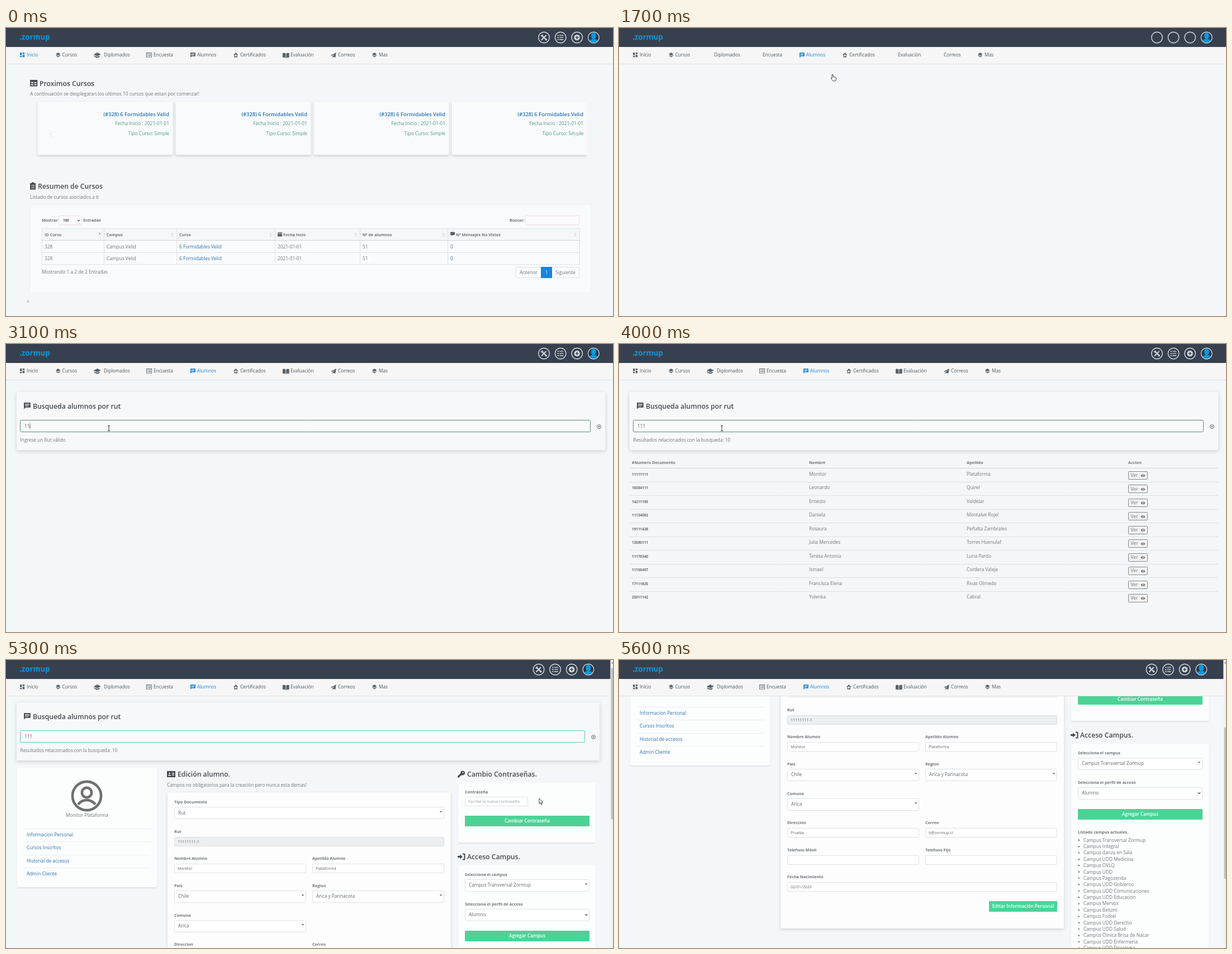
An HTML page with a canvas that plays this animation: 1086x516 px, repeating every 6300 ms.

```html
<!DOCTYPE html>
<html lang="es">
<head>
<meta charset="utf-8">
<title>Busqueda alumnos</title>
<style>
html, body { margin: 0; width: 100%; height: 100%; overflow: hidden; background: #f4f7f9; }
canvas { display: block; width: 1086px; height: 516px; }
</style>
</head>
<body>
<canvas id="stage"></canvas>
<script>
const W = 1086, H = 516, LOOP = 6300, STEP = 100;
const canvas = document.getElementById('stage');
const c = canvas.getContext('2d');
const dpr = window.devicePixelRatio || 1;
canvas.width = W * dpr;
canvas.height = H * dpr;

const FONT = '"Open Sans", "Noto Sans", sans-serif';
const DARK = '#454b52', GREY = '#707478', BLUE = '#2a6fb3', GREEN = '#4bd396', LINE = '#dde1e4';

const ICONS = {
  dash: 'M0 0h5v7h-5zM7 0h5v4h-5zM0 9h5v3h-5zM7 6h5v6h-5z',
  layers: 'M6 0L12 4 6 8 0 4zM1.5 6.5L6 9.5 10.5 6.5 12 7.5 6 12 0 7.5z',
  cap: 'M8 0L16 4 8 8 0 4zM3 7L8 9.5 13 7V10Q8 13 3 10zM1 5h1v6h-1z',
  news: 'M0 0h13v11H0zM1.2 1.2v8.6h10.6V1.2zM2.5 3h2v1h-2zM5.5 3h5v1h-5zM2.5 5h2v1h-2zM5.5 5h5v1h-5zM2.5 7h2v1h-2zM5.5 7h5v1h-5z',
  chat: 'M0 0h12v9H3l-3 3zM2 2h8v1H2zM2 4h8v1H2zM2 6h6v1H2z',
  house: 'M6 0L12 6H10V12H2V6H0zM5 4.5h2v2h2v2H7v2H5v-2H3v-2h2z',
  book: 'M0 1Q4 0 6 2V11Q4 9 0 10zM7 2Q9 0 13 1V10Q9 9 7 11z',
  plane: 'M12 0L10 11 6 9 4 12V8L10 2 3 7 0 6z',
  table: 'M0 0h14v12H0zM2 4h4v2H2zM8 4h4v2H8zM2 8h4v2H2zM8 8h4v2H8z',
  clip: 'M0 1.5h3V0h4v1.5h3V13H0zM2 4.5h1v1H2zM4 4.5h4v1H4zM2 7h1v1H2zM4 7h4v1H4zM2 9.5h1v1H2zM4 9.5h4v1H4z',
  cal: 'M0 1h2V0h1v1h3V0h1v1h2v8H0zM0 3v.8h9V3z',
  msg: 'M1 0h7q1 0 1 1v4q0 1-1 1H4L2 8V6H1Q0 6 0 5V1Q0 0 1 0z',
  card: 'M0 0h15v11H0zM2 8.5h5v-1q-2.5-2-5 0zM3.2 4a1.3 1.3 0 1 0 2.6 0a1.3 1.3 0 1 0-2.6 0zM9 3h4v1H9zM9 5h4v1H9zM9 7h4v1H9z',
  key: 'M9 0a4 4 0 1 1-1.6 7.6L6 9H4.5V10.5H3V12H0V9.5L5.2 4.8A4 4 0 0 1 9 0zM9.5 2a1.2 1.2 0 1 0 .1 0z',
  login: 'M0 4.5h4V2l5 4-5 4V7.5H0zM9 0h3q1.5 0 1.5 1.5v9q0 1.5-1.5 1.5H9V10h2.5V2H9z',
  eye: 'M0 3Q4-2 8 3 4 8 0 3zM4 1.2a1.8 1.8 0 1 0 .1 0zM4 2.2a.8 .8 0 1 0 .1 0z',
  rows: 'M0 0h2v2H0zM3.5 .2H11v1.5H3.5zM0 4h2v2H0zM3.5 4.2H11v1.5H3.5zM0 8h2v2H0zM3.5 8.2H11v1.5H3.5z',
  plus: 'M5.5 0a5.5 5.5 0 1 0 .01 0zM4.7 2.5h1.6v2.2h2.2v1.6H6.3v2.2H4.7V6.3H2.5V4.7h2.2z',
  arrow: 'M0 0V10.2L2.4 8 4 11.6 5.6 10.9 4 7.4H7.2z',
  hand: 'M0 1Q1-.6 2 1V4.6Q3.2 3.8 4 5 5.2 4.3 6 5.4 7.6 5 7.8 6.5V9Q7.6 11 6.6 12.5H1.8Q0 10-1.8 7.6-1.6 6.2 0 7.6z'
};
for (const k in ICONS) ICONS[k] = new Path2D(ICONS[k]);

function icon(name, x, y, color = '#565e66', s = 1, edge) {
  c.save();
  c.translate(x, y);
  c.scale(s, s);
  c.fillStyle = color;
  c.fill(ICONS[name], 'evenodd');
  if (edge) {
    c.strokeStyle = edge;
    c.lineWidth = 0.9;
    c.stroke(ICONS[name]);
  }
  c.restore();
}

function text(s, x, y, size = 8.3, color = GREY, weight = 400, align = 'left') {
  c.font = `${weight} ${size}px ${FONT}`;
  c.fillStyle = color;
  c.textAlign = align;
  c.fillText(s, x, y);
}
const title = (s, x, y) => text(s, x, y, 12.2, DARK, 600);
const label = (s, x, y) => text(s, x, y, 7.2, GREY, 700);
const crisp = v => Math.round(v) + 0.5;

function rect(x, y, w, h, fill, stroke, r = 0) {
  c.beginPath();
  c.roundRect(x, y, w, h, r);
  if (fill) { c.fillStyle = fill; c.fill(); }
  if (stroke) { c.strokeStyle = stroke; c.lineWidth = 1; c.stroke(); }
}

function panel(x, y, w, h, fill, blur = 5, alpha = 0.18, r = 2) {
  c.save();
  c.shadowColor = `rgba(40,55,70,${alpha})`;
  c.shadowBlur = blur * dpr;
  c.shadowOffsetY = 2 * dpr;
  rect(x, y, w, h, fill, null, r);
  c.restore();
}

function line(color, width, ...p) {
  c.beginPath();
  for (let i = 0; i < p.length; i += 2) c.lineTo(p[i], p[i + 1]);
  c.strokeStyle = color;
  c.lineWidth = width;
  c.stroke();
}

function ring(x, y, r, color, width, fill) {
  c.beginPath();
  c.arc(x, y, r, 0, Math.PI * 2);
  if (fill) { c.fillStyle = fill; c.fill(); }
  if (width) { c.strokeStyle = color; c.lineWidth = width; c.stroke(); }
}

function caret(x, y, s, color = '#777', dir = 1) {
  c.beginPath();
  c.moveTo(x - s, y);
  c.lineTo(x + s, y);
  c.lineTo(x, y + s * 1.3 * dir);
  c.fillStyle = color;
  c.fill();
}

// name, icon, scale, icon x, text x, text x while the icon font is missing
const NAV = [
  ['Inicio', 'dash', .68, 25, 37, 37],
  ['Cursos', 'layers', .7, 89, 100.5, 100.5],
  ['Diplomados', 'cap', .8, 157, 175, 170],
  ['Encuesta', 'news', .78, 251, 264, 257],
  ['Alumnos', 'chat', .74, 330, 342, 335],
  ['Certificados', 'house', .7, 407, 419, 412],
  ['Evaluación', 'book', .9, 495, 509, 499],
  ['Correos', 'plane', .82, 581, 594, 581],
  ['Mas', 'layers', .7, 655, 667, 654]
];
const LATE = ['cap', 'news', 'book', 'plane'];

function tools(x, color) {
  line(color, 2, x - 4, 13, x + 4.5, 21.5);
  line(color, 2, x + 4, 13, x - 4.5, 21.5);
  ring(x - 3.6, 13.4, 2, '', 0, color);
  ring(x + 3.8, 20.8, 1.7, '', 0, color);
  line('#37404f', 1.2, x - 5.8, 11.2, x - 3.8, 13.2);
}

function header(ready, active, right) {
  rect(0, 34, right, 30, '#f6f6f6');
  line('#e1e2e3', 1, 0, 64.5, right, 64.5);
  rect(0, 0, right, 34, '#37404f');
  text('.zormup', 24, 21, 13.3, '#0f95d9', 700);
  const dx = right < W ? -9.5 : 0;
  for (let i = 0; i < 4; i++) ring(962.5 + 29.6 * i + dx, 17, 9.8, '#d5dade', 1.4);
  if (ready) {
    tools(962.5 + dx, '#d5dade');
    icon('rows', 986.8 + dx, 12.2, '#d5dade', .95);
    icon('plus', 1016.4 + dx, 11.8, '#d5dade', .95);
  }
  const ax = 1051.3 + dx;
  c.save();
  ring(ax, 17, 9, '', 0, '#2b3848');
  c.clip();
  c.fillStyle = '#0b98dd';
  c.beginPath();
  c.ellipse(ax, 26, 9, 6.5, 0, 0, 7);
  c.fill();
  c.beginPath();
  c.ellipse(ax, 14, 4.5, 6, 0, 0, 7);
  c.fill();
  c.restore();
  for (const [name, ic, s, ix, tx, early] of NAV) {
    const on = active.includes(name), x = ready ? tx : early;
    const gap = early === tx ? 0 : tx - early;
    if (ready || !LATE.includes(ic))
      icon(ic, ready ? ix : ix - gap, 44, on ? '#1b86d8' : '#56626c', s);
    text(name, x, 51.3, 8.3, on ? '#1b86d8' : '#4c545b');
  }
}

function menu(hover) {
  panel(315, 64, 147, 79, '#f8f8f8', 4, 0.25, 1);
  ['Rut', 'Correo', 'Nombre'].forEach((s, i) =>
    text('Busqueda Alumno Por ' + s, 330, 85.5 + 20.5 * i, 8.3, hover && !i ? '#1b86d8' : '#5b6167'));
}

function home() {
  icon('table', 43, 93, DARK, .95);
  title('Proximos Cursos', 60, 103.5);
  text('A continuación se desplegaran los ultimos 10 cursos que estan por comenzar!', 43, 121, 8.4);
  c.save();
  c.beginPath();
  c.rect(50, 131, 989, 106);
  c.clip();
  for (let i = 0; i < 4; i++) {
    const x = 56.5 + 247 * i;
    panel(x, 132, 242, 95.5, '#f9fafb', 4, 0.22, 3);
    text('(#328) 6 Formidables Velid', x + 235.5, 157.5, 9.3, '#2272b8', 600, 'right');
    text('Fecha Inicio : 2021-01-01', x + 235.5, 174, 8.45, '#4c9a80', 400, 'right');
    text('Tipo Curso: Simple', x + 235.5, 192, 8.45, '#4c9a80', 400, 'right');
  }
  c.restore();
  line('#e3e6e8', 1, 86, 185, 77.5, 190, 86, 196);
  line('#eceeef', 1.2, 1014, 185, 1022, 190, 1014, 196);

  icon('clip', 43, 276.5, DARK);
  title('Resumen de Cursos', 57, 287.5);
  text('Listado de cursos asociados a ti', 43, 305.5, 8.4);
  rect(43.5, 316.5, 1003, 158, '#f9fafb', '#f1f3f5');
  label('Mostrar', 64, 347);
  rect(94.5, 336.5, 41, 16, '#fbfafc', '#ecdaea', 2);
  text('100', 102, 347, 6.2, '#555', 700);
  line('#444', 1.1, 128, 343.8, 130, 346, 132, 343.8);
  label('Entradas', 138, 347);
  label('Buscar:', 901, 347);
  rect(929.5, 336.5, 96, 16, '#fbfafc', '#ecdaea', 2);

  const cols = [64.5, 175.5, 305.5, 481.5, 633.5, 790.5, 1026.5];
  const heads = ['ID Curso', 'Campus', 'Curso', 'Fecha Incio', 'Nº de alumnos', 'Nº Mensajes No Vistos'];
  const cells = ['328', 'Campus Velid', '6 Formidables Velid', '2021-01-01', '51', '0'];
  rect(64.5, 359.5, 962, 64, '#fafbfc', LINE);
  rect(65, 360, 961, 21, '#f5f6f7');
  heads.forEach((h, i) => {
    const x = cols[i] + 4.5, ic = i === 3 ? 'cal' : i === 5 ? 'msg' : '';
    if (ic) icon(ic, x, 365.5, '#565e66', .9);
    label(h, x + (ic ? 10 : 0), 373);
    const sx = cols[i + 1] - 8;
    caret(sx, 369.3, 1.9, i ? '#d0d4d7' : '#7d8388', -1);
    if (i) caret(sx, 371.3, 1.9, '#d0d4d7');
    for (const y of [394.5, 415.5]) text(cells[i], x, y, 8.3, i === 2 || i === 5 ? BLUE : GREY);
  });
  cols.forEach(x => line(LINE, 1, x, 360, x, 423.5));
  line('#cfd4d8', 1, 64, 380.5, 1027, 380.5);
  line(LINE, 1, 64, 402.5, 1027, 402.5);
  text('Mostrando 1 a 2 de 2 Entradas', 64, 440);
  rect(912.5, 428.5, 113, 19, '#fafbfc', LINE, 2);
  rect(957, 428, 20, 20, '#1686e0');
  text('Anterior', 919, 440.5);
  text('1', 967, 440.5, 8.3, '#fff', 400, 'center');
  text('Siguiente', 983, 440.5);
  text('>', 37, 493);
}

function searchCard(inset, typed, status, dark, beam) {
  panel(19, 86, 1053 - inset, 104, '#f7f8fa', 7, 0.2, 2);
  icon('chat', 32, 105, DARK, .98);
  title('Busqueda alumnos por rut', 48, 116);
  rect(25.5, 136.5, 1020 - inset, 21, '#f9fafb', dark ? '#5c8a70' : '#52cba5', 2);
  text(typed || 'Ingresar Rut', 33, 150, 8.3, typed ? '#5a6066' : '#9a9fa4');
  if (beam) {
    const x = 33.5 + (typed ? c.measureText(typed).width : 0);
    line('#444', .8, x, 142.5, x, 152);
  }
  text(status, 25.5, 174.8);
  const x = 1061 - inset;
  ring(x, 148, 3.5, '#666', 1);
  line('#666', 1, x - 1.4, 146.6, x + 1.4, 149.4);
  line('#666', 1, x + 1.4, 146.6, x - 1.4, 149.4);
}

const PEOPLE = [
  ['11111111', 'Monitor', 'Plataforma'],
  ['16384111', 'Leonardo', 'Quirel'],
  ['14211165', 'Ernesto', 'Valdelar'],
  ['11134062', 'Daniela', 'Montalve Rojel'],
  ['19111436', 'Rosaura', 'Peñalta Zambrales'],
  ['13580111', 'Julia Mercedes', 'Torres Huenulaf'],
  ['11176340', 'Teresa Antonia', 'Luna Pardo'],
  ['11150497', 'Ismael', 'Cordera Valeje'],
  ['17111625', 'Francisca Elena', 'Rivas Olmedo'],
  ['25011142', 'Yolenka', 'Cabral']
];

function results(hover) {
  label('#Numero Documento', 23, 214.5);
  label('Nombre', 340, 214.5);
  label('Apellido', 622, 214.5);
  label('Accion', 911, 214.5);
  line('#cfd4d7', 1, 19, 222.5, 1072, 222.5);
  PEOPLE.forEach(([id, first, last], i) => {
    const y = 236 + 24.45 * i, below = crisp(y + 11);
    text(id, 23, y, 6.4, '#666', 700);
    text(first, 340, y);
    text(last, 622, y);
    rect(911.5, crisp(y - 8), 34, 14, hover && !i ? '#e3e3e3' : '#f2f2f2', '#858585', 1);
    text('Ver', 915.5, y + 2.2, 8.3, '#70757a');
    icon('eye', 933.5, y - 3.2, '#555');
    if (i < PEOPLE.length - 1) line('#dde1e4', 1, 19, below, 1072, below);
  });
}

function button(x, y, w, s, fill = GREEN) {
  rect(x, y, w, 19, fill, null, 1);
  text(s, x + w / 2, y + 12.4, 8.2, '#fff', 600, 'center');
}
function field(name, value, x, y, w, fill = '#fff', color = '#666') {
  label(name, x, y);
  rect(x + .5, crisp(y + 6.5), w - 1, 16, fill, LINE, 1);
  text(value, x + 6, y + 17.6, 7.1, color);
}
function select(name, value, x, y, w, native) {
  label(name, x, y);
  rect(x + .5, crisp(y + 6), w - 1, 21, '#fff', LINE, 2);
  text(value, x + 7, y + 19.5, 8.3, '#5e6368');
  const ax = x + w - 6;
  if (native) line('#444', 1.2, ax - 2.2, y + 15.5, ax, y + 17.8, ax + 2.2, y + 15.5);
  else caret(ax, y + 13.5, 2.3);
}

const CAMPUS = ['Transversal Zormup', 'Integral', 'danza en Sala', 'UDD Medicina', 'OVLQ', 'UDD', 'Pagozenda',
  'UDD Gobierno', 'UDD Comunicaciones', 'UDD Educacion', 'Mervox', 'Belumi', 'Fodrel', 'UDD Derecho',
  'UDD Salud', 'Clinica Brisa de Nacar', 'UDD Enfermeria', 'UDD Psicologia'];

function profile(hover) {
  panel(20, 155, 250, 214, '#fcfdfd', 2, 0.1);
  ring(144.5, 205.5, 25.6, '#6f6f6f', 4.6);
  ring(144.5, 199.5, 8.6, '#6f6f6f', 4.6);
  c.beginPath();
  c.arc(144.5, 232, 19, Math.PI * 1.2, Math.PI * 1.8);
  c.strokeStyle = '#6f6f6f';
  c.lineWidth = 4.6;
  c.stroke();
  text('Monitor Plataforma', 145, 243, 8.3, GREY, 400, 'center');
  ['Informacion Personal', 'Cursos Inscritos', 'Historial de accesos', 'Admin Cliente'].forEach((s, i) => {
    const y = 264 + 23.4 * i;
    line('#e9ecee', 1, 32, crisp(y), 259, crisp(y));
    text(s, 37, y + 14, 8.3, BLUE);
  });

  icon('card', 288, 161, DARK);
  title('Edición alumno.', 307, 171);
  text('Campos no obligatorios para la creación pero nunca esta demas!', 288, 189);
  panel(289, 199, 507, 462, '#fdfdfe', 5, 0.18);
  select('Tipo Documento', 'Rut', 301, 219, 483);
  field('Rut', '11111111-1', 301, 272, 483, '#eceeef');
  field('Nombre Alumno', 'Monitor', 301, 320, 236);
  field('Apellido Alumno', 'Plataforma', 548, 320, 236);
  select('Pais', 'Chile', 301, 368.7, 236);
  select('Region', 'Arica y Parinacota', 548, 368.7, 236);
  select('Comuna', 'Arica', 301, 421.7, 236);
  field('Direccion', 'Prueba', 301, 474.3, 236);
  field('Correo', 'ti@zormup.cl', 548, 474.3, 236);
  field('Telefono Móvil', '', 301, 523, 236);
  field('Telefono Fijo', '', 548, 523, 236);
  field('Fecha Nacimiento', '02/01/2020', 301, 571.3, 483);
  button(662, 612, 122, 'Editar Información Personal');

  icon('key', 808, 160.5, DARK);
  title('Cambio Contraseñas.', 825, 171);
  panel(809, 182, 246, 107, '#fcfdfd', 2, 0.1);
  field('Contraseña', 'Escribe la nueva contraseña', 821, 200.7, 113, '#fff', '#9a9fa4');
  button(821, 241, 223, 'Cambiar Contraseña', hover ? '#33d089' : GREEN);
  icon('login', 808, 308.5, DARK);
  title('Acceso Campus.', 825, 319);
  panel(809, 330, 246, 500, '#fcfdfd', 2, 0.1);
  select('Selecciona el campus', 'Campus Transversal Zormup', 821, 348.8, 223);
  select('Selecciona el perfil de acceso', 'Alumno', 821, 401.8, 223, true);
  button(821, 447, 223, 'Agregar Campus');
  label('Listado campus actuales.', 821, 491);
  CAMPUS.forEach((s, i) => {
    const y = 505.6 + 11.38 * i;
    ring(822.8, y - 2.8, 1.2, '', 0, '#666');
    text('Campus ' + s, 831, y);
  });
}

// time, x, y of the pointer tip
const PATH = [
  [200, 1020, 114], [800, 370, 51], [900, 370, 51], [1500, 381, 83], [1700, 381, 83],
  [2100, 212, 178], [2300, 184, 151], [4100, 184, 151], [4700, 937.5, 239],
  [4900, 937.5, 239], [5000, 940, 241], [5200, 940, 241], [5400, 968, 255], [5500, 968, 255]
];

function pointer(t) {
  if (t < 200 || t >= 5500) return;
  const i = PATH.findIndex(p => p[0] > t);
  const [t0, x0, y0] = PATH[i - 1], [t1, x1, y1] = PATH[i];
  let u = (t - t0) / (t1 - t0);
  u = u * u * (3 - 2 * u);
  const x = x0 + (x1 - x0) * u, y = y0 + (y1 - y0) * u;
  if (t >= 800 && t < 1800) return icon('hand', x, y, '#fff', .95, '#222');
  if (t >= 2300 && t < 5000 && y < 158) {
    line('#333', 1, x, y - 4.5, x, y + 4.5);
    line('#333', 1, x - 2, y - 4.5, x + 2, y - 4.5);
    line('#333', 1, x - 2, y + 4.5, x + 2, y + 4.5);
    return;
  }
  icon('arrow', x, y, '#fff', .95, '#222');
}

function draw(t) {
  c.setTransform(dpr, 0, 0, dpr, 0, 0);
  c.textBaseline = 'alphabetic';
  rect(0, 0, W, H, '#f4f7f9');
  const detail = t >= 5000;
  const typed = t < 2800 ? '' : t < 3000 ? '1' : t < 3400 ? '11' : '111';
  const status = t < 2800 ? 'Ingrese un Rut válido para comenzar'
    : t < 3600 ? 'Ingrese un Rut válido' : 'Resultados relacionados con la busqueda: 10';
  const focus = t >= 2600 && t < 4100;

  if (t < 1700) {
    home();
    header(true, t < 800 ? ['Inicio'] : ['Inicio', 'Alumnos'], W);
    if (t >= 900) menu(t >= 1300);
  } else if (!detail) {
    if (t >= 2000) searchCard(0, typed, status, focus, focus && t < 3600);
    if (t >= 3600) results(t >= 4600);
    header(t >= 2200, ['Alumnos'], W);
  } else {
    const u = Math.min(1, Math.max(0, (t - 5200) / 400));
    const scroll = Math.round(228 * Math.pow(u, 2.25));
    c.save();
    c.translate(0, -scroll);
    searchCard(10, typed, status, false, false);
    c.translate(0, 48);
    profile(t >= 5400 && t < 5500);
    c.restore();
    header(true, ['Alumnos'], 1081.5);
    rect(1081.5, 0, 5, H, '#f1f1f1');
    caret(1085, 6, 2, '#777', -1);
    rect(1082.5, 9.5 + scroll * .489, 4, 271, '#c1c1c1');
  }
  pointer(t);
}

let start;
function tick(now) {
  if (start === undefined) start = now;
  draw(Math.floor((now - start) % LOOP / STEP) * STEP);
  requestAnimationFrame(tick);
}
requestAnimationFrame(tick);
</script>
</body>
</html>
```
